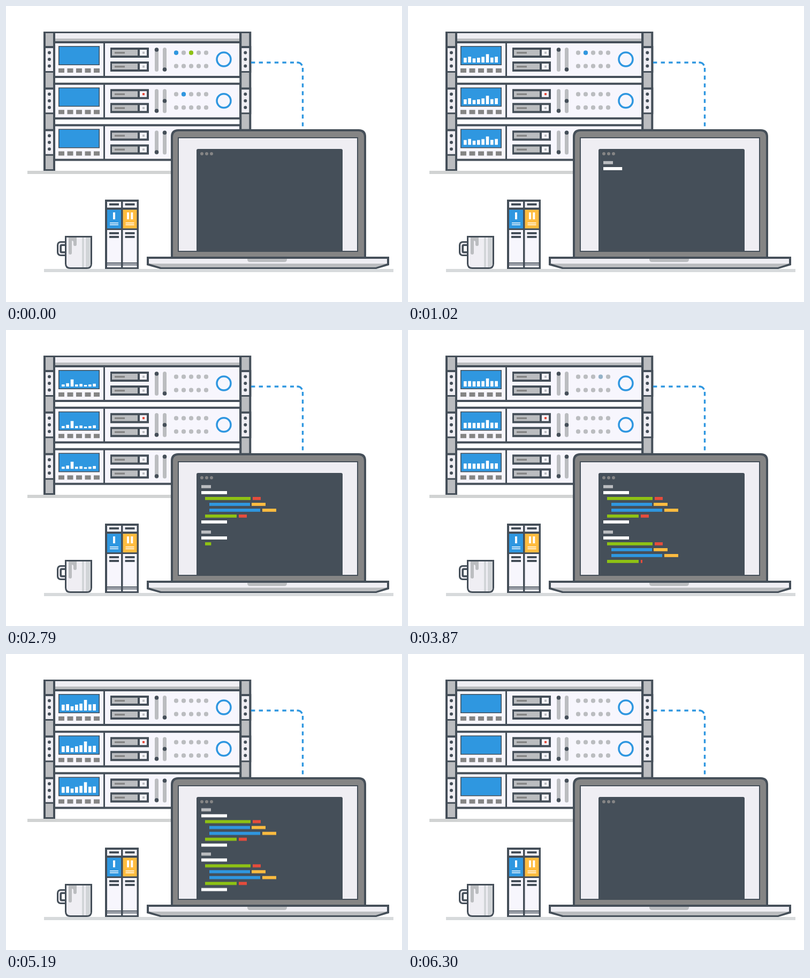
An HTML page without scripts for the animation above (6.39 s loop, 740 by 555 pixels).

```html
<!DOCTYPE html>
<html lang="en">
<head>
<meta charset="utf-8">
<title>Server rack and laptop</title>
<style>
@property --t { syntax: '<number>'; inherits: true; initial-value: 0; }
:root {
  --dark: #454f59; --mid: #858585; --grey: #bbbdc0; --soft: #efeef3; --panel: #f7f6fd;
  --blue: #2f97e0; --green: #8ec214; --red: #e64c3c; --gold: #ffbc40;
  --loop: 6390ms;
}
html, body { margin: 0; width: 100%; height: 100%; overflow: hidden; background: #fff; }
svg { display: block; width: 740px; height: 555px; }
.dark { fill: var(--dark); } .mid { fill: var(--mid); } .grey { fill: var(--grey); }
.soft { fill: var(--soft); } .panel { fill: var(--panel); } .white { fill: #fff; }
.blue { fill: var(--blue); } .green { fill: var(--green); } .red { fill: var(--red); } .gold { fill: var(--gold); }
.line { fill: none; }

/* Equaliser bars: each bar has its own five heights */
.bars rect { width: 5.6px; height: 1px; y: -1px; fill: #fff; transform: scaleY(0); animation: wave var(--loop) linear infinite; }
.bars rect:nth-child(1) { x: 104px; --a: 13; --b: 8; --c: 3; --d: 4; --e: 11; }
.bars rect:nth-child(2) { x: 112.3px; --a: 8; --b: 7; --c: 8; --d: 6; --e: 12; }
.bars rect:nth-child(3) { x: 120.7px; --a: 9.5; --b: 13; --c: 7; --d: 14; --e: 8; }
.bars rect:nth-child(4) { x: 129px; --a: 13; --b: 8; --c: 3; --d: 4; --e: 11; }
.bars rect:nth-child(5) { x: 137.3px; --a: 9; --b: 5; --c: 4; --d: 5; --e: 13; }
.bars rect:nth-child(6) { x: 145.7px; --a: 9; --b: 6; --c: 3; --d: 3; --e: 20; }
.bars rect:nth-child(7) { x: 154px; --a: 13; --b: 8; --c: 3; --d: 4; --e: 11.5; }
.bars rect:nth-child(8) { x: 162.3px; --a: 10; --b: 7; --c: 8; --d: 5; --e: 12; }
@keyframes wave {
  0%, .4%, 98%, 100% { transform: scaleY(0); }
  5.63%, 35% { transform: scaleY(var(--a)); }
  28.17%, 56% { transform: scaleY(var(--b)); }
  10%, 50.23%, 93% { transform: scaleY(var(--c)); }
  43%, 69.48%, 88% { transform: scaleY(var(--d)); }
  18%, 63%, 81.22% { transform: scaleY(var(--e)); }
}

/* Indicator lights: hard on, soft off */
.leds * { opacity: 0; animation: flash var(--loop) linear var(--at) infinite; }
@keyframes flash { 0%, 2% { opacity: 1; } 4%, 100% { opacity: 0; } }

/* Code: --t counts the typed pieces, --i is the place of each piece */
.code { animation: type var(--loop) linear infinite; }
.code rect {
  --p: clamp(0, var(--t) - var(--i) - var(--from), 1);
  height: 5.8px; transform-box: fill-box; transform-origin: 0 0;
  transform: scaleX(calc(var(--p) * var(--p) * (3 - 2 * var(--p))));
}
@keyframes type { 0%, 12% { --t: 0; } 64.68%, 100% { --t: 22; } }
.block { animation: lift var(--loop) linear infinite; }
@keyframes lift {
  0%, 74.18% { transform: none; animation-timing-function: ease-in-out; }
  78.87% { transform: translateY(9px); animation-timing-function: ease-in; }
  81.22% { transform: translateY(var(--s)); }
  81.69% { transform: translateY(-30px); }
  82.16% { transform: translateY(-75px); }
  82.63% { transform: translateY(-134px); }
  83.1%, 100% { transform: translateY(-205px); }
}
</style>
</head>
<body>
<svg viewBox="0 0 740 555" xmlns="http://www.w3.org/2000/svg">
<defs>
  <g id="drive">
    <path class="dark" d="M195 78h72v19h-72z"/>
    <path class="grey" d="M198 82h48v11h-48z"/>
    <path class="mid" d="M203 86h19v3.4h-19z"/>
    <path class="panel" d="M250 82h13v11h-13z"/>
    <path class="grey" d="M255 85.6h4v4h-4z"/>
  </g>
  <g id="server">
    <path class="dark" d="M90 66h348v69H90z"/>
    <path class="panel" d="M92 70h90v61H92zM185 70h251v61H185z"/>
    <path class="dark" d="M98 75h77v36H98z"/>
    <path class="blue" d="M99.5 76.5h74v33h-74z"/>
    <path class="line" d="M98 121h77" stroke="var(--mid)" stroke-width="8" stroke-dasharray="11 5.5"/>
    <use href="#drive"/><use href="#drive" y="26"/>
    <path class="line" d="M281.5 81.5v38M296.5 81.5v38" stroke="var(--grey)" stroke-width="7" stroke-linecap="round"/>
    <path class="line" d="M318 87.7h57M318 112.7h57" stroke="var(--grey)" stroke-width="8.2" stroke-linecap="round" stroke-dasharray="0 14"/>
    <circle class="line" cx="407" cy="100" r="13" stroke="var(--blue)" stroke-width="3.5"/>
  </g>
  <g id="ear">
    <path class="dark" d="M70 75h22v50H70z"/>
    <path class="soft" d="M74 79h14v43H74z"/>
    <path class="line" d="M81 87.6v26" stroke="var(--dark)" stroke-width="6" stroke-linecap="round" stroke-dasharray="0 12.5"/>
  </g>
  <g id="post">
    <path class="dark" d="M70 48h22v261H70z"/>
    <path class="grey" d="M74 51h14v255H74z"/>
    <use href="#ear"/><use href="#ear" y="77.7"/><use href="#ear" y="155.7"/>
  </g>
  <g id="book">
    <path class="panel" d="M189 367h26v11h-26zM189 420h26v61h-26zM189 483h26v1.6h-26zM189 486.3h26v3.7h-26z"/>
    <path class="dark" d="M193 370h18v4h-18zM193 424h18v4h-18zM193 431h18v4h-18z"/>
    <path d="M189 382h26v35h-26z"/>
    <path class="white" d="M194 406h16v1.5h-16zM194 409.6h16v1.5h-16z"/>
  </g>
  <clipPath id="pane"><path d="M356 268h273v191H356z"/></clipPath>
</defs>

<!-- Shelf and rack -->
<path fill="#d1d3d3" d="M40 309h280v6H40z"/>
<path class="dark" d="M70 48h388v22H70z"/>
<path class="soft" d="M92 51h344v10H92z"/>
<path class="grey" d="M92 61h344v5H92z"/>
<use href="#server"/><use href="#server" y="77.7"/><use href="#server" y="155.5"/>
<use href="#post"/><use href="#post" x="366.3"/>
<g class="dark">
  <circle cx="281.5" cy="82" r="3.8"/><circle cx="296.5" cy="119" r="3.8"/>
  <circle cx="281.5" cy="196.5" r="3.8"/><circle cx="296.5" cy="178" r="3.8"/>
  <circle cx="281.5" cy="274" r="3.8"/><circle cx="296.5" cy="237.5" r="3.8"/>
</g>
<path class="red" d="M255 163.2h4v4h-4z"/>

<g class="bars" transform="translate(0 106)"><rect/><rect/><rect/><rect/><rect/><rect/><rect/><rect/></g>
<g class="bars" transform="translate(0 184)"><rect/><rect/><rect/><rect/><rect/><rect/><rect/><rect/></g>
<g class="bars" transform="translate(0 260.3)"><rect/><rect/><rect/><rect/><rect/><rect/><rect/><rect/></g>

<g class="leds">
  <circle class="blue" cx="318" cy="87.7" r="4.1" style="--at:0ms"/>
  <circle class="green" cx="346" cy="87.7" r="4.1" style="--at:0ms"/>
  <circle class="blue" cx="332" cy="165.4" r="4.1" style="--at:0ms"/>
  <circle class="blue" cx="360" cy="190.4" r="4.1" style="--at:200ms"/>
  <circle class="green" cx="374" cy="87.7" r="4.1" style="--at:450ms"/>
  <path class="blue" d="M255 267.1h4v4h-4z" style="--at:480ms"/>
  <circle class="blue" cx="332" cy="87.7" r="4.1" style="--at:900ms"/>
  <circle class="green" cx="346" cy="165.4" r="4.1" style="--at:1250ms"/>
  <circle class="green" cx="332" cy="112.7" r="4.1" style="--at:1635ms"/>
  <path class="blue" d="M255 189.3h4v4h-4z" style="--at:1635ms"/>
  <circle class="blue" cx="318" cy="87.7" r="4.1" style="--at:2200ms"/>
  <circle class="green" cx="318" cy="190.4" r="4.1" style="--at:3045ms"/>
  <path class="blue" d="M255 267.1h4v4h-4z" style="--at:3045ms"/>
  <circle class="blue" cx="360" cy="87.7" r="4.1" style="--at:3650ms"/>
  <circle class="green" cx="346" cy="87.7" r="4.1" style="--at:4275ms"/>
  <circle class="blue" cx="332" cy="165.4" r="4.1" style="--at:4800ms"/>
  <circle class="blue" cx="318" cy="87.7" r="4.1" style="--at:5500ms"/>
  <circle class="green" cx="360" cy="87.7" r="4.1" style="--at:5980ms"/>
</g>

<!-- Cable -->
<g class="line" stroke="var(--blue)" stroke-width="3.4">
  <path d="M458 106h80M554.5 116v115" stroke-dasharray="7.4 7.2"/>
  <path d="M543.5 106h2.5q5 .5 7.2 5.5"/>
</g>

<!-- Desk, mug and books -->
<path fill="#d7dadc" d="M71 493h653v6H71z"/>
<rect class="dark" x="95" y="441" width="26" height="28" rx="7"/>
<rect class="soft" x="98" y="444" width="22" height="22" rx="4.5"/>
<rect class="dark" x="100.5" y="446.5" width="20" height="17" rx="3.5"/>
<rect class="white" x="104" y="450" width="12" height="10" rx="1"/>
<path class="dark" d="M110 431h51v52q0 10-10 10h-31q-10 0-10-10z"/>
<path class="soft" d="M113 434h45v49q0 7-7 7h-31q-7 0-7-7z"/>
<path fill="#d2d5d8" d="M142 434h4v56h-4zM149 434h9v49q0 7-7 7h-2z"/>
<path class="grey" d="M117 434h15v13a3 3 0 0 1-6 0v-4q0-3-3-3v23a3 3 0 0 1-6 0z"/>
<path class="dark" d="M185 363h63v130h-63z"/>
<use href="#book" class="blue"/>
<use href="#book" class="gold" x="29.5"/>
<path class="white" d="M200 387h4v13h-4zM226 387h4v13h-4zM233.3 387h4v13h-4z"/>

<!-- Laptop -->
<path class="dark" d="M308 473V245q0-14 14-14h337q14 0 14 14v228z"/>
<path class="mid" d="M312 470V246q0-11 11-11h335q11 0 11 11v224z"/>
<path class="dark" d="M321 246h337v215H321z"/>
<path class="soft" d="M323 248h333v211H323z"/>
<path class="dark" d="M356 460V271q0-3 3-3h267q3 0 3 3v189z"/>
<g class="mid"><circle cx="366" cy="277" r="3"/><circle cx="375" cy="277" r="3"/><circle cx="384" cy="277" r="3"/></g>
<path class="dark" d="M263 470h453v16l-24 7H288l-25-7z"/>
<path class="soft" d="M267 474h445v9H267z"/>
<path class="grey" d="M267 483h445l-21 7H290z"/>
<path class="grey" d="M451 474h74v1q0 5-5 5h-64q-5 0-5-5z"/>

<g class="code" clip-path="url(#pane)">
  <g class="block" style="--from:0;--s:-.6px">
    <rect class="grey" x="365" y="290.8" width="18" style="--i:0"/>
    <rect class="white" x="365" y="302" width="48" style="--i:1"/>
    <rect class="green" x="372" y="313" width="85" style="--i:2"/>
    <rect class="red" x="461" y="313" width="15" style="--i:3"/>
    <rect class="blue" x="380" y="324" width="76" style="--i:4"/>
    <rect class="gold" x="459" y="324" width="26" style="--i:5"/>
    <rect class="blue" x="380" y="335" width="95" style="--i:6"/>
    <rect class="gold" x="479" y="335" width="26" style="--i:7"/>
    <rect class="green" x="372" y="346" width="59" style="--i:8"/>
    <rect class="red" x="435" y="346" width="15" style="--i:9"/>
    <rect class="white" x="365" y="357" width="48" style="--i:10"/>
  </g>
  <g class="block" style="--from:11;--s:-2.8px">
    <rect class="grey" x="365" y="376" width="18" style="--i:0"/>
    <rect class="white" x="365" y="387" width="48" style="--i:1"/>
    <rect class="green" x="372" y="398" width="85" style="--i:2"/>
    <rect class="red" x="461" y="398" width="15" style="--i:3"/>
    <rect class="blue" x="380" y="409" width="76" style="--i:4"/>
    <rect class="gold" x="459" y="409" width="26" style="--i:5"/>
    <rect class="blue" x="380" y="420" width="95" style="--i:6"/>
    <rect class="gold" x="479" y="420" width="26" style="--i:7"/>
    <rect class="green" x="372" y="431" width="59" style="--i:8"/>
    <rect class="red" x="435" y="431" width="15" style="--i:9"/>
    <rect class="white" x="365" y="442.5" width="48" style="--i:10"/>
  </g>
</g>
</svg>
</body>
</html>
```
